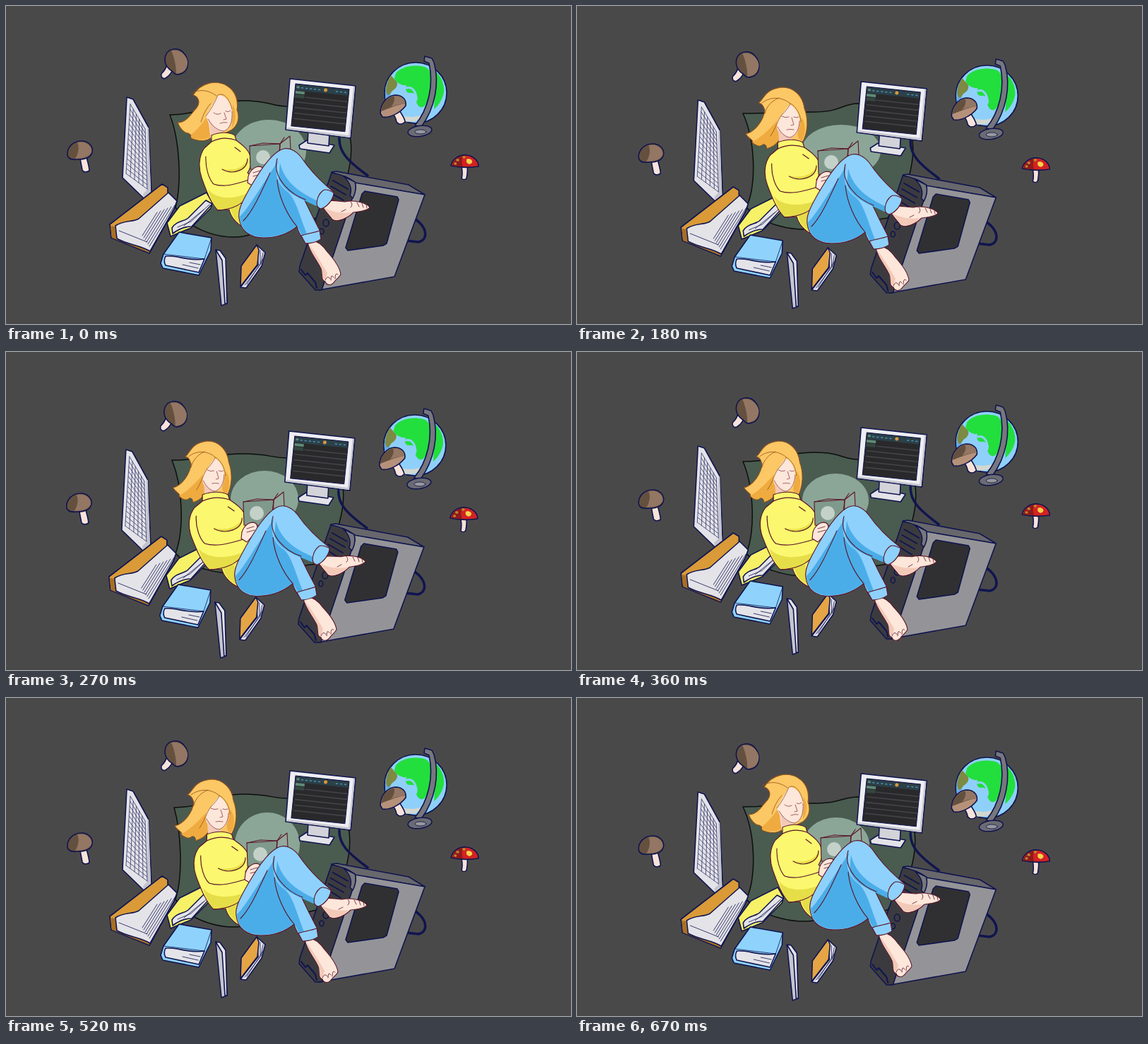
An HTML page that plays this animation: 800x450 px, repeating every 0.7 s.

```html
<!DOCTYPE html>
<html lang="en">
<head>
<meta charset="utf-8">
<title>Floating reader</title>
<style>
html, body { margin: 0; width: 100%; height: 100%; overflow: hidden; background: #4a494a; }
svg { display: block; width: 100%; height: 100%; }
path, ellipse, circle { stroke-linejoin: round; stroke-linecap: round; }
.things { stroke: #10154f; stroke-width: 1.6; fill: none; }
.girl { stroke: #5a1428; stroke-width: 1.1; fill: none; }
.things .n, .girl .n { stroke: none; }
.thin { stroke-width: .8; }
.face { stroke: #96525a; stroke-width: .9; }
.skin { fill: #fde6da; }
.pink { fill: #f3c9b8; }
.hair { fill: #fcc765; stroke: #8f5218; }
.hair2 { fill: #efab40; }
.page { fill: #e4e3e8; }
.cap { fill: #64503f; }
.cap2 { fill: #937663; }
.stem { fill: #f8e3da; }
</style>
</head>
<body>
<svg viewBox="0 0 800 450" preserveAspectRatio="none">
  <rect width="800" height="450" fill="#4a494a"/>
  <path id="cushion" fill="#4a5b50" stroke="#0b0f0c" stroke-width="1.5"/>
  <ellipse id="badge" fill="#8ba697"/>

  <g id="things" class="things">
    <!-- upper mushroom -->
    <path class="stem" d="M228 82L235 92C233 97 229 100 226 102C222 104 219 100 220 96C224 92 227 88 228 82Z"/>
    <path class="cap" d="M226 70C230 59 245 58 252 67C260 76 259 90 250 95C244 98 239 97 236 93C228 88 223 80 226 70Z"/>
    <path class="cap2 n" d="M234 63C246 60 255 69 257 78C258 88 252 95 241 96C241 84 238 72 234 63Z"/>

    <!-- left mushroom -->
    <path class="stem" d="M105 216L114 214C116 222 118 228 118 233C114 236 109 235 108 232C107 227 106 222 105 216Z"/>
    <path class="cap" d="M87 211C86 200 95 191 107 191C117 191 124 199 122 207C120 214 112 217 103 217C95 218 88 217 87 211Z"/>
    <path class="cap2 n" d="M101 193C114 190 123 199 121 207C118 213 111 216 98 216C103 208 104 199 101 193Z"/>

    <!-- red mushroom -->
    <path class="stem" d="M645 226L653 226C654 233 653 239 652 244C650 246 647 246 645 244C647 238 646 233 645 226Z"/>
    <path fill="#d32222" d="M630 226C632 216 642 210 652 211C662 212 669 219 669 227C656 229 643 229 630 226Z"/>
    <path fill="#8d1a1c" class="n" d="M632 225C634 217 641 213 647 212C645 217 645 223 647 227C641 227 636 227 632 225Z"/>
    <path fill="#f3d34c" class="n" d="M652 217C656 215 661 218 660 221C658 225 654 224 652 221Z"/>
    <path stroke="#b98a2e" stroke-width="3.500" d="M639 218h1M636 223h.5M648 214h1"/>

    <!-- globe -->
    <ellipse cx="580" cy="123" rx="44" ry="43" fill="#8fd0fa"/>
    <path class="n" fill="#67abe8" d="M537 122C536 148 554 165 572 164C554 156 543 142 543 104C539 108 537 114 537 122Z"/>
    <path class="n" fill="#22df3d" d="M552 95C560 86 576 82 592 86C600 88 604 98 604 110C603 122 600 132 593 141C588 146 583 142 581 136C585 130 581 123 574 123C566 124 565 118 567 112C560 113 551 108 550 102ZM609 93C617 101 621 112 620 122C618 132 613 140 606 146Z"/>
    <path class="n" fill="#7d8a43" d="M545 98L553 107C556 112 552 117 547 120C543 126 540 130 538 119C539 110 541 104 545 98Z"/>
    <path stroke="#8fd0fa" stroke-width="3" d="M567 116C575 114 580 120 581 130"/>
    <path class="n" fill="#d3d7d0" d="M552 156C564 154 574 161 592 153C588 163 568 170 552 156Z"/>
    <path fill="#77777d" d="M593 71L603 74L606 80C614 108 608 144 588 171L579 169C598 146 606 112 599 81L592 78Z"/>
    <ellipse cx="586" cy="177" rx="17" ry="7.500" fill="#6b6b72" transform="rotate(-8 586 177)"/>
    <ellipse cx="587" cy="178" rx="8" ry="3" fill="#98989f" class="thin"/>

    <!-- globe mushroom -->
    <path class="stem" d="M546 150L556 146C560 153 565 159 565 164C561 168 556 168 553 164C552 159 550 154 546 150Z"/>
    <path fill="#b6917a" d="M530 152C530 138 540 127 551 126C561 126 567 132 566 141C558 152 542 159 533 157Z"/>
    <path class="cap n" d="M531 149C532 138 541 128 551 127C560 127 565 132 565 138C552 140 540 146 531 149Z"/>
    <path class="cap2 n" d="M549 127C561 127 566 133 565 138C560 139 552 140 545 143C550 137 551 131 549 127Z"/>

    <!-- keyboard -->
    <path class="page" d="M171 129L180 132L202 172L206 263L195 272L165 243Z"/>
    <path class="n" fill="#c3c4cd" d="M200 172L202 172L205 263L195 271L194 266L200 260Z"/>
    <path id="keys" class="thin" stroke="#33386a"/>

    <!-- books -->
    <path fill="#d99a37" d="M147 309L221 252L229 257L229 264L242 276L238 287L203 350L149 328Z"/>
    <path class="n" fill="#a86f22" d="M148 311L154 312L157 330L203 346L203 349L150 328Z"/>
    <path class="page" d="M155 311C166 303 180 306 188 301L230 264L242 276L238 287L204 347C190 338 172 338 157 329Z"/>
    <path id="fan" class="thin"/>
    <path fill="#f6f167" d="M228 307L246 283L284 264L292 278L290 286L262 314L233 326Z"/>
    <path class="page" d="M235 314C241 304 252 305 258 300L283 275L292 280L263 312C254 312 244 316 236 322Z"/>
    <path class="thin" d="M243 313L262 305L288 281M252 311L280 288"/>
    <path fill="#8fd3fc" d="M223 351L245 320L291 328L290 346L273 381L222 371L219 364Z"/>
    <path class="page" d="M226 354C240 352 262 362 281 358L273 377L226 367C223 362 224 358 226 354Z"/>
    <path class="thin" d="M223 351L281 358L291 328M250 366L272 371M260 363L275 366"/>
    <path fill="#c6c6ce" d="M297 345L309 357L313 421L305 424Z"/>
    <path class="page" d="M297 345L303 346L311 357L313 421L310 421L306 360Z"/>
    <path class="page" d="M355 338L367 349L362 368L340 399L332 398L357 366Z"/>
    <path fill="#e6a544" d="M333 368L355 338L358 345L356 366L332 397Z"/>
    <path class="thin" d="M338 395L361 365L364 349M341 394L364 358M360 346L360 364"/>

    <!-- monitor -->
    <path stroke-width="3.500" d="M472 187C471 207 485 220 512 240"/>
    <path class="page" d="M415 197L426 190L465 197L458 208L416 202Z"/>
    <path fill="#d3d3da" d="M428 176L458 180L457 198L427 194Z"/>
    <path fill="#eeeef2" d="M402 103L495 113L488 187L396 175Z"/>
    <path class="n" fill="#c6c6cf" d="M492 114L494 114L487 186L397 174L398 172L485 183Z"/>
    <g transform="matrix(1 .105 -.1 .98 410 110)" stroke="none">
      <path fill="#29292b" stroke="#10154f" stroke-width="1" d="M0 0H76V61H0Z"/>
      <path fill="#2b4048" d="M1 1H75V9H1Z"/>
      <path fill="#5f8a78" d="M1 10H14V14H1ZM2 3H6V6H2Z"/>
      <path fill="#344640" d="M1 15H14V20H1Z"/>
      <path stroke="#444448" d="M16 18H75M3 26H75M3 34H75M3 42H75M3 50H75"/>
      <path stroke="#4d8fb4" stroke-width="1.500" stroke-dasharray="2 4" d="M9 5H36M58 5H74"/>
      <circle cx="43" cy="4.500" r="2.500" fill="#d9953f"/>
    </g>

    <!-- computer -->
    <path stroke-width="3.500" d="M580 302C597 314 598 331 584 334L566 332"/>
    <path fill="#67676c" d="M461 235L468 234L570 253L593 267L495 251Z"/>
    <path fill="#949498" d="M494 250L593 267L550 383L443 402Z"/>
    <path fill="#3b3b3f" d="M461 236C475 238 488 244 494 250C496 256 494 264 491 270L447 402L438 402L415 376L416 368Z"/>
    <path fill="#77777c" d="M478 241L494 249C496 255 495 264 491 272L487 268C490 260 488 250 478 241Z"/>
    <path fill="#303032" d="M508 262L554 270L556 274L539 336L534 339L484 346L481 342L504 266Z"/>
    <path stroke-width="2" d="M463 247L484 259M460 255L481 267M457 263L478 275M455 271L474 283M418 373L424 381L427 378L438 391L440 399"/>
    <ellipse cx="453" cy="307" rx="4" ry="5"/>
    <ellipse cx="447" cy="319" rx="3" ry="4"/>
  </g>

  <g class="girl">
    <g id="headA">
      <path class="hair" d="M265 126C276 108 298 104 313 113C326 121 329 135 327 147C331 157 329 168 320 175L302 184L291 185C286 192 272 192 262 187C263 184 262 182 258 180C252 180 246 173 243 165C256 165 262 152 270 144C276 136 272 128 265 126Z"/>
      <path class="hair2 n" d="M262 182C272 174 280 164 285 156L288 166L290 184C284 190 270 190 262 186ZM321 140C326 148 327 162 320 172Z"/>
      <path class="skin n" d="M300 126C311 126 318 136 320 148C322 161 318 172 310 177L306 177L308 186L290 188L287 166L283 156C288 146 294 136 300 126Z"/>
      <path class="pink n" d="M287 160C292 170 299 176 306 177L305 182L291 186Z"/>
      <path class="thin" stroke="#8f5218" d="M283 156C290 147 296 136 300 126C308 122 316 130 320 146M262 124C276 116 288 120 298 127M276 164C280 152 284 144 290 138"/>
      <path class="face" d="M286 160C292 170 300 177 309 177C318 173 321 162 320 149M294 151Q299 155 304 152M311 149Q315 151 318 148M309 151L312 160L308 161M303 166Q308 164 313 165"/>
    </g>
    <g id="headB">
      <path class="hair" d="M290 115C308 115 320 128 322 145C328 160 327 180 319 193C312 194 304 190 298 188L287 188C283 196 276 200 268 202C270 198 268 196 264 195C260 200 253 198 248 193C251 190 243 188 239 181C252 178 264 162 266 148C264 141 262 138 257 137C265 133 264 118 290 115Z"/>
      <path class="hair2 n" d="M248 192C262 186 274 172 284 162L287 186C283 195 276 199 269 200C268 194 262 194 258 198ZM318 158C325 168 324 182 318 191C312 188 311 180 314 174Z"/>
      <path class="skin n" d="M301 139C311 144 317 156 315 170C313 179 308 185 302 186L308 195L285 198L287 181C283 176 282 170 284 163C288 156 295 147 301 139Z"/>
      <path class="pink n" d="M285 173C289 180 295 185 302 186L303 189L286 194Z"/>
      <path class="thin" stroke="#8f5218" d="M274 184C282 172 284 162 290 154C296 148 300 143 302 138C310 142 317 154 317 164M262 137C274 128 290 128 302 138M266 152C268 142 276 134 286 130"/>
      <path class="face" d="M284 171C288 179 295 186 302 186C310 183 315 174 315 163M290 156Q295 159 300 157M307 157Q311 159 314 157M304 158L307 168L303 169M297 175Q302 174 307 175"/>
    </g>

    <g id="torso">
      <path fill="#fbf86f" d="M291 183C302 178 316 178 324 183L326 190C334 196 345 204 346 214C348 222 346 230 342 236L358 250L338 314C325 308 318 297 316 288L300 289C290 279 283 260 277 243C272 228 273 212 281 201L291 192Z"/>
      <path class="n" fill="#e6de48" d="M300 288C292 278 288 268 286 259C296 272 318 276 344 264L338 276L318 287ZM318 287L332 281L338 312C326 306 319 296 318 287ZM342 218C342 234 322 240 306 230C322 234 334 230 342 218Z"/>
      <path d="M291 192C303 186 315 186 326 190M283 213C282 230 288 246 294 252C310 258 330 250 344 246M300 289C318 288 334 283 343 268M342 216C342 232 322 240 306 231M324 200L332 206"/>
    </g>

    <g id="book">
      <path fill="#7f9a8c" d="M345 198L388 195L386 232L346 231Z"/>
      <path fill="#93a99d" d="M388 195L402 184L403 204L387 226Z"/>
      <circle class="n" cx="364" cy="214" r="10" fill="#c4d1c9"/>
      <path d="M345 198L364 194L388 195L394 186M388 196L386 214"/>
      <path class="skin" d="M343 241C346 231 355 225 362 228C366 231 366 238 362 242L350 255L342 250Z"/>
      <path class="thin" d="M350 236L360 233M350 241L361 238"/>
    </g>

    <g id="legs">
      <path class="skin" d="M447 282C455 272 466 276 480 277C492 274 510 278 515 285C512 290 500 291 492 292C484 300 470 307 462 302C458 296 452 291 447 282Z"/>
      <path class="pink n" d="M450 285C462 292 476 294 490 292C482 300 470 305 463 301Z"/>
      <path class="thin" d="M488 277Q492 281 488 285M497 278L500 284M504 279L506 285M510 281L511 286M475 291L481 288"/>
      <path class="skin" d="M427 334C438 329 448 338 455 348C464 358 473 370 474 380C470 386 466 388 465 390C461 396 454 396 452 390C446 388 448 382 448 376C443 362 430 350 427 334Z"/>
      <path class="pink n" d="M430 338C438 350 446 362 455 378L452 388C446 384 449 376 446 370C440 358 432 350 430 338Z"/>
      <path class="thin" d="M452 388Q455 380 459 386M460 388Q460 378 464 384M466 386Q466 376 470 380"/>
      <path fill="#8ed1fc" d="M330 300C328 288 336 274 345 258C358 236 372 213 388 204C398 198 410 204 418 214C430 232 445 248 464 263C464 272 458 282 446 287L438 281C432 277 427 275 422 273C430 290 437 304 445 319C444 330 435 335 425 336C419 328 413 318 412 312C400 322 385 328 365 328C345 328 332 318 330 300Z"/>
      <path class="n" fill="#4bade8" d="M331 298C340 290 352 270 386 218C378 240 386 254 400 264C412 276 416 300 430 332L424 334L412 311C398 322 384 327 365 327C345 327 332 316 331 298ZM388 222C394 248 414 264 446 278L444 285C420 274 392 264 386 244Z"/>
      <path d="M384 216C376 242 402 266 424 274M384 246C386 270 398 296 412 312M336 304C350 290 362 262 374 236M446 286C439 282 440 268 449 262L463 264M418 326C424 322 434 322 444 319"/>
      <path fill="#8ed1fc" d="M449 261C454 258 460 262 464 264C464 272 456 284 446 287C436 285 440 268 449 261ZM418 325C426 322 436 321 444 318L446 330C440 334 432 336 424 336Z"/>
    </g>
  </g>
</svg>
<script>
const LOOP = 700, STEP = 30;
const $ = id => document.getElementById(id);
const mix = (a, b, k) => a + (b - a) * k;
const set = (id, m) => $(id).setAttribute('transform', `matrix(${m})`);

// time; corner x, y; top edge y at 1/3 and at the monitor; right, left, bottom; badge cx, cy, rx, ry
const cushion = [
  [0,   232, 154, 134, 142, 488, 246, 328, 372, 205, 53, 44],
  [60,  234, 156, 136, 132, 480, 252, 326, 378, 205, 59, 48],
  [180, 235, 152, 150, 138, 475, 252, 317, 374, 205, 56, 37],
  [270, 235, 153, 144, 150, 477, 250, 314, 366, 208, 48, 40],
  [360, 235, 155, 142, 152, 479, 250, 318, 366, 210, 47, 38],
  [520, 238, 155, 136, 142, 486, 248, 325, 370, 207, 46, 45],
  [670, 235, 154, 149, 140, 478, 252, 317, 367, 208, 47, 39]
];
cushion.push([LOOP, ...cushion[0].slice(1)]);

const floats = [[0, 0], [0.3, 4], [-1.2, 9]];
const still = [1, 0, 0, 1, 0, 0];
const poses = [
  { torso: still, book: still, legs: still },
  { headB: still, torso: [1.07, 0, 0, 1, -27, 10], book: [1, 0, 0, 1, -4, 7], legs: [1, 0, 0, 1, -4, 8] },
  { headB: [.95, 0, 0, 1, 9.5, 11], torso: [1.1, 0, 0, 1, -42, 19],
    book: [1, 0, 0, 1, -9, 14], legs: [1, -.04, 0, 1, -6, 32] }
];

// there and back through three drawings, each held for some steps
const swing = (list, n, hold) => list[[0, 1, 2, 1][Math.floor((n + hold - 2) / hold) % 4]];

function drawKeys() {
  const at = (u, v) => [
    mix(mix(176, 197, u), mix(170, 200, u), v).toFixed(1),
    mix(mix(139, 174, u), mix(237, 259, u), v).toFixed(1)
  ];
  let d = '';
  for (let i = 0; i <= 5; i++) d += `M${at(i / 5, 0)}L${at(i / 5, 1)}`;
  for (let j = 0; j <= 14; j++) d += `M${at(0, j / 14)}L${at(1, j / 14)}`;
  $('keys').setAttribute('d', d);
  let fan = '';
  for (let i = 0; i < 6; i++) fan += `M${203 - i * 2} ${340 - i * 3}L${239 - i * 5} ${282 + i * 2}`;
  $('fan').setAttribute('d', fan + 'M160 318L200 334');
}

function drawCushion(t) {
  const i = cushion.findIndex(k => k[0] > t);
  const a = cushion[i - 1], b = cushion[i];
  const k = (t - a[0]) / (b[0] - a[0]);
  const [, x, y, top, edge, right, left, low, cx, cy, rx, ry] = a.map((v, n) => mix(v, b[n], k));
  $('cushion').setAttribute('d',
    `M${x} ${y}C${x + 45} ${y} 295 ${top} 335 ${top}S375 ${edge} 398 ${edge}L480 160` +
    `L${right} 190Q${right + 3} 215 ${right - 6} 245L440 300L336 ${low - 2}` +
    `C310 ${low + 2} 262 ${low - 6} 240 285C${left + 3} 250 ${left} 190 ${x} ${y}Z`);
  Object.entries({ cx, cy, rx, ry }).forEach(([n, v]) => $('badge').setAttribute(n, v));
}

function draw(time) {
  const t = time % LOOP;
  const late = t < 430 ? 0 : 10;
  const n = Math.floor((t - late) / STEP);
  drawCushion(n * STEP + late);
  set('things', [1, 0, 0, 1, ...swing(floats, n, 5)]);
  const pose = swing(poses, n, 6);
  $('headA').style.display = pose.headB ? 'none' : '';
  $('headB').style.display = pose.headB ? '' : 'none';
  for (const part in pose) set(part, pose[part]);
}

drawKeys();
draw(0);
const start = performance.now();
(function tick() {
  draw(performance.now() - start);
  requestAnimationFrame(tick);
})();
</script>
</body>
</html>
```
